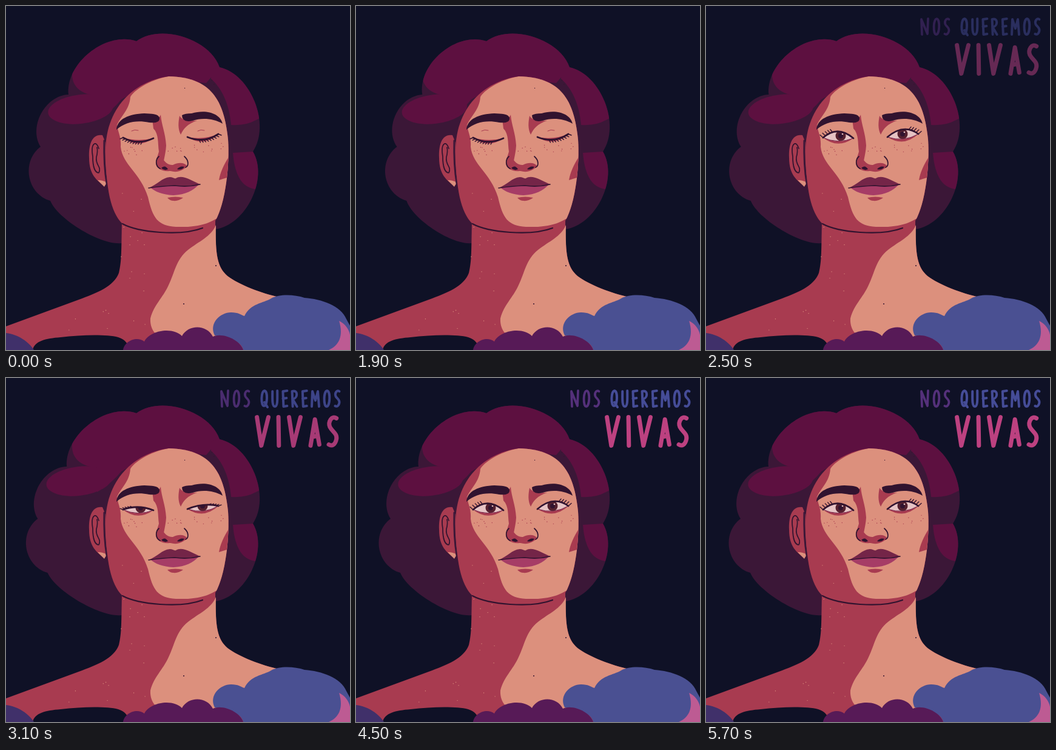
Recreate the animation shown at these times as an HTML page with a canvas. Size 567 px wide and 567 px high, loop 5900 ms.

```html
<!DOCTYPE html>
<html lang="es">
<head>
<meta charset="utf-8">
<title>Nos queremos vivas</title>
<style>
html, body { margin: 0; width: 100%; height: 100%; overflow: hidden; background: #0f1126; }
canvas { display: block; width: 567px; height: 567px; }
</style>
</head>
<body>
<canvas id="stage" width="567" height="567" role="img" aria-label="Nos queremos vivas"></canvas>
<script>
const ctx = document.getElementById('stage').getContext('2d');
const LOOP = 5900;
const C = {
  night: '#0f1126', hair: '#3b1737', hairLight: '#5d1040', shade: '#a83b50', skin: '#dc907d',
  ink: '#31132f', lipTop: '#742548', lipLow: '#a63c66', iris: '#54202f', white: '#e6c3c4',
  blue: '#4a5092', plum: '#571a57', pink: '#bd5b93', violet: '#40306a'
};

const lerp = (a, b, k) => a + (b - a) * k;
const clamp = v => Math.max(0, Math.min(1, v));
const ramp = (t, from, to) => clamp((t - from) / (to - from));
const hold = (t, step) => Math.floor(t / step) * step;

// Motion: the hair drifts in, then out; the eyes open and blink once; the text fades in.
function hairSway(t) {
  const turn = 2550, end = 4500;
  if (t < turn) return 11 * Math.sin(Math.PI * t / turn);
  return -7 * Math.sin(Math.PI * ramp(t, turn, end));
}
const lidOpening = t => ramp(t, 2000, 2400) * (1 - clamp(1 - Math.abs(t - 2900) / 310));
const textAlpha = t => 1 - (1 - ramp(t, 1900, 3500)) ** 1.5;

function fill(d, color) {
  ctx.fillStyle = color;
  ctx.fill(d instanceof Path2D ? d : new Path2D(d));
}

function line(d, width, color = C.ink) {
  ctx.strokeStyle = color;
  ctx.lineWidth = width;
  ctx.stroke(d instanceof Path2D ? d : new Path2D(d));
}

function dot(x, y, r, color) {
  ctx.fillStyle = color;
  ctx.beginPath();
  ctx.arc(x, y, r, 0, Math.PI * 2);
  ctx.fill();
}

function within(shape, paint) {
  ctx.save();
  ctx.clip(shape);
  paint();
  ctx.restore();
}

// Closed outline of round lobes: each corner is [x, y, height of the lobe that follows].
function scallop(corners) {
  const path = new Path2D();
  path.moveTo(corners[0][0], corners[0][1]);
  corners.forEach(([x, y, height], i) => {
    const [nx, ny] = corners[(i + 1) % corners.length];
    const dx = nx - x, dy = ny - y, lift = height * 4 / 3 / Math.hypot(dx, dy);
    path.bezierCurveTo(x + dx * .2 + dy * lift, y + dy * .2 - dx * lift,
      nx - dx * .2 + dy * lift, ny - dy * .2 - dx * lift, nx, ny);
  });
  return path;
}

const CURLS = [[190, 391, 15], [73, 321, 27], [57, 232, 25], [103, 146, 33],
  [215, 58, 30], [352, 101, 33], [407, 240, 32], [345, 368, 0]];

function drawHair(sway) {
  const shape = scallop(CURLS.map(([x, y, h]) =>
    [x + sway * ramp(x, 190, 70) * ramp(y, 80, 160), y, h]));
  fill(shape, C.hair);
  within(shape, () => {
    const lock = new Path2D();
    lock.ellipse(123 + sway * .6, 170, 54, 24, -.12, 0, Math.PI * 2);
    fill(lock, C.hairLight);
    fill('M109 111C108 135 128 147 150 147V188Q176 172 190 154L250 119L330 127L352 101V0H100Z', C.hairLight);
    fill('M338 105L352 100H440V178C410 184 408 198 371 196C368 160 355 135 338 120Z', C.hairLight);
    fill('M374 242L440 238V302H415C385 302 376 270 374 242Z', C.hairLight);
  });
}

const FACE = new Path2D('M268 116C220 122 164 160 164 240C165 300 172 340 192 359C225 378 310 380 345 354C362 325 369 260 366 220C360 165 345 117 268 116Z');

function drawBody() {
  fill('M191 355C190 400 191 420 186 440C178 462 150 473 120 484L0 528V567H450V480C420 473 385 460 365 445C348 430 345 410 345 350Z', C.shade);
  fill('M346 361C338 380 318 388 300 402C280 418 278 440 268 460C258 482 244 492 238 515C237 532 246 542 258 550H450V480C420 473 385 460 365 445C348 430 345 410 346 361Z', C.skin);
  fill('M44 567C47 552 65 548 90 546C125 542 165 541 185 546C198 550 201 558 205 567Z', C.night);
  fill('M0 539C20 541 38 554 46 567H0Z', C.violet);
  fill('M391 567C388 550 360 546 344 543C334 523 353 505 371 505C383 505 387 509 393 511C403 490 424 490 437 482C452 474 476 476 492 481C520 483 552 494 561 516L567 527V567Z', C.blue);
  fill('M549 519C559 524 565 532 567 542V567H532C548 560 557 545 549 519Z', C.pink);
  fill(scallop([[193, 567, 10], [228, 553, 13], [290, 544, 15], [341, 545, 10], [391, 567, 0]]), C.plum);
}

function drawFace() {
  fill('M159 213C142 210 136 228 137 250C137 279 150 287 162 297L167 290L164 225Z', C.shade);
  fill('M151 287L162 298L166 291Q160 287 151 287Z', C.skin);
  line('M143 248C139 225 149 221 153 235M143 248C143 263 146 275 153 275C158 264 147 263 149 249C151 242 151 237 150 233', 1.7);
  line('M162 222Q161 262 166 292', 3, C.hair);
  fill(FACE, C.shade);
  within(FACE, () => {
    fill('M268 116C235 122 210 140 205 150C203 172 190 180 183 196C185 210 190 215 189 232C192 262 222 275 234 315C242 350 250 362 280 364H300C325 362 335 357 346 351H400V100H268Z', C.skin);
    fill('M367 249C359 262 353 274 351 287L370 281Z', C.shade);
  });
  fill('M241 186C249 188 254 183 255 179C256 195 263 210 264 230C263 247 258 257 260 265L249 265C245 258 250 248 252 240C250 225 252 211 243 202Z', C.shade);
  fill('M286 181C290 188 300 190 315 189C299 194 292 203 288 212C283 202 284 192 286 181Z', C.shade);
  // nose
  fill('M252 242C258 252 264 263 275 262C285 257 294 258 299 264C290 272 282 275 271 272C256 273 248 268 247 258Z', C.shade);
  line('M252 248C246 253 246 264 254 268M294 248C302 255 301 264 296 266', 1.7);
  fill('M256 267Q262 261 267 269Q261 272 256 267ZM282 269Q287 263 294 265Q290 271 282 269Z', C.ink);
  // mouth
  fill('M238 299Q280 292 317 295C309 304 296 311 276 312C258 311 245 306 238 299Z', C.lipLow);
  fill('M235 300C250 294 257 283 270 282C275 282 277 285 280 284C286 280 294 282 301 285L320 294Q300 299 278 296Q255 297 235 300Z', C.lipTop);
  line('M235 300Q255 297 278 296Q300 299 320 294', 1.6);
  fill('M266 316Q279 313 292 316Q284 322 276 321Q270 321 266 316Z', C.shade);
  line('M192 359C218 373 287 380 324 366', 2.2);
  // brows
  fill('M182 204C183 186 203 178 228 177C240 178 250 177 253 184C254 192 246 193 236 192C215 188 197 191 182 204Z', C.ink);
  fill('M290 180Q295 177 306 177C330 170 353 177 357 194C342 185 322 184 308 189Q290 193 290 180Z', C.ink);
}

// Each eye runs from its outer corner to its inner corner.
const EYES = [
  { out: [193, 217], inn: [243, 218], mid: 217, iris: [222, 214], side: -1 },
  { out: [350, 211], inn: [299, 216], mid: 326, iris: [324, 211], side: 1 }
];

function drawEye({ out, inn, mid, iris, side }, open) {
  const low = iris[1] + 14, lidY = lerp(low + 2, iris[1] - 18, open);
  const awake = open > .1;
  const upper = `M${out}Q${mid} ${lidY} ${inn}`;
  const lidPoint = k => [0, 1].map(i =>
    (1 - k) ** 2 * out[i] + 2 * k * (1 - k) * [mid, lidY][i] + k * k * inn[i]);

  fill(`M${out}Q${mid} ${low + 8} ${inn}Q${mid} ${low - 4} ${out}Z`, C.shade);
  if (awake) {
    const shape = new Path2D(`${upper}Q${mid} ${low} ${out}Z`);
    fill(shape, C.white);
    within(shape, () => {
      dot(...iris, 8.5, C.iris);
      dot(...iris, 4, C.ink);
      dot(iris[0] + 3, iris[1] - 3, 1.3, C.white);
    });
    line(`M${out}Q${mid} ${low} ${inn}`, 1, C.lipTop);
  } else {
    line(`M${mid - 10} 206Q${mid - 5} 203 ${mid + 1} 205`, 1, C.shade);
  }
  line(upper, 2.8);
  for (let k = 0; k < (awake ? .4 : .65); k += .08) {
    const dx = side * lerp(5, 1, k), dy = awake ? lerp(3, -4.5, open) : lerp(2, 6, k);
    line(`M${lidPoint(k)}l${dx} ${dy}`, 1.4);
  }
}

function drawSpecks() {
  let seed = 11;
  const rnd = (a, b) => {
    seed = seed * 16807 % 2147483647;
    return lerp(a, b, seed / 2147483647);
  };
  const scatter = (n, x, y, w, h, color) => {
    for (let i = 0; i < n; i++) dot(rnd(x, x + w), rnd(y, y + h), .7, color);
  };
  scatter(10, 195, 232, 34, 16, C.shade);
  scatter(10, 310, 226, 50, 18, C.shade);
  scatter(7, 263, 232, 26, 9, C.shade);
  scatter(14, 190, 300, 40, 170, C.skin);
  scatter(8, 90, 490, 140, 45, C.skin);
  scatter(3, 285, 120, 60, 16, C.ink);
  dot(346, 428, 1, C.ink);
  dot(293, 491, 1, C.ink);
}

// Brush letters, 30 units tall: [width, strokes].
const GLYPHS = {
  N: [15, 'M3 28L2 3L12 27L13 2'],
  O: [13, 'M7 2C1 3 1 27 6 28C12 28 13 3 7 2Z'],
  S: [11, 'M9 3C5 0 1 6 3 11C5 15 10 17 9 22C8 27 5 29 2 27'],
  Q: [13, 'M7 2C1 3 1 26 6 27C12 27 13 3 7 2ZM7 21L12 29'],
  U: [12, 'M2 3C2 14 1 28 6 28C11 28 10 14 10 2'],
  E: [10, 'M9 2L2 3L3 28L9 27M2 15L8 14'],
  R: [12, 'M3 28L2 3C12 0 12 14 3 16L10 28'],
  M: [15, 'M2 28L3 3L8 18L12 3L14 28'],
  V: [14, 'M2 2L6 28L12.5 2'],
  I: [4, 'M2 2L2.4 28'],
  A: [11, 'M2 28L6 4L10 27M3.4 20L8.6 19']
};

function letter(word, x, y, scale, gap, weight, color) {
  for (const ch of word) {
    const [width, d] = GLYPHS[ch], path = new Path2D();
    path.addPath(new Path2D(d), new DOMMatrix([scale, 0, 0, scale, x, y]));
    line(path, weight, color);
    x += (width + gap) * scale;
  }
}

function drawText(alpha) {
  ctx.globalAlpha = alpha;
  letter('NOS', 353, 19, 1, 5.2, 3.8, '#54307a');
  letter('QUEREMOS', 419, 19, 1, 5.2, 4, '#454c97');
  letter('VIVAS', 410, 61, 1.8, 5.7, 7, '#bd4180');
  ctx.globalAlpha = 1;
}

function draw(t) {
  ctx.lineCap = ctx.lineJoin = 'round';
  ctx.fillStyle = C.night;
  ctx.fillRect(0, 0, 567, 567);
  drawHair(hairSway(hold(t, 500)));
  drawBody();
  drawFace();
  const open = lidOpening(hold(t, 100));
  for (const eye of EYES) drawEye(eye, open);
  drawSpecks();
  drawText(textAlpha(hold(t, 100)));
}

const start = performance.now();
function tick() {
  draw((performance.now() - start) % LOOP);
  requestAnimationFrame(tick);
}
tick();
</script>
</body>
</html>
```
